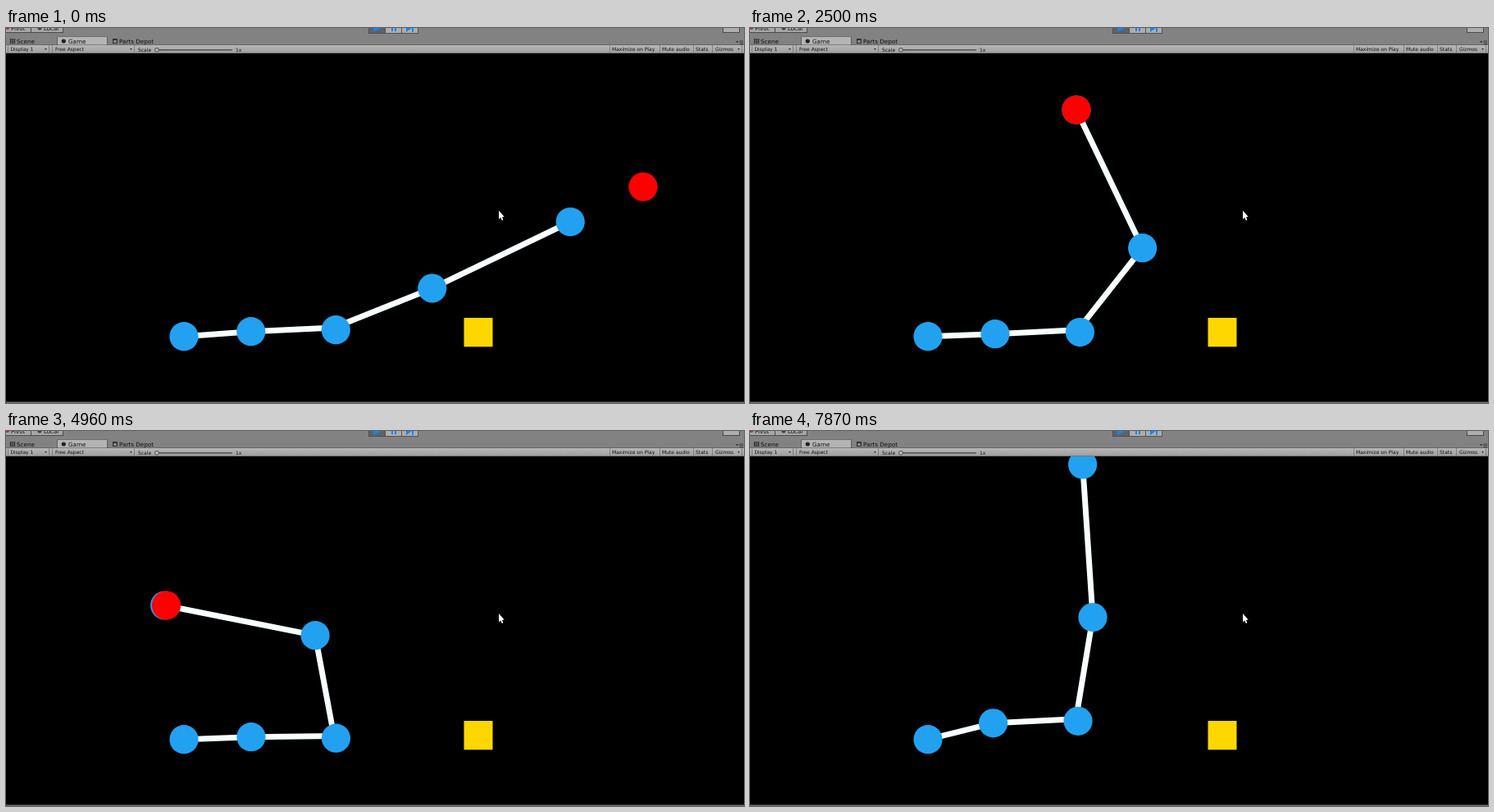
Write an HTML page with a canvas that moves like this. It is 900 by 458 pixels and loops after 7990 ms.

```html
<!DOCTYPE html>
<html lang="en">
<head>
<meta charset="utf-8">
<title>Robot arm</title>
<style>
  html, body { margin: 0; width: 100%; height: 100%; overflow: hidden; background: #000; }
  canvas { display: block; }
</style>
</head>
<body>
<canvas id="stage" width="900" height="458"></canvas>
<script>
const ctx = document.getElementById('stage').getContext('2d');
const LOOP = 7990, RAD = Math.PI / 180, R = 17.6;
const BASE = [217, 376.7], LENGTHS = [82, 103.5, 128, 187];
const BLUE = '#22a1f0';

// The picture advances in steps: [first, last, count]
const runs = [[0, 0, 1], [120, 510, 4], [940, 1940, 8], [2070, 3040, 8], [3160, 4140, 8],
  [4260, 5220, 8], [5340, 5880, 5], [6160, 7140, 8], [7280, 7870, 5]];
const steps = runs.flatMap(([a, b, n]) =>
  Array.from({ length: n }, (_, i) => n > 1 ? Math.round((a + (b - a) * i / (n - 1)) / 10) * 10 : a));

// Keyed values: [time, value], eased between keys
const targetX = [[0, 777], [830, 777], [1800, 398], [2500, 398], [3500, 728], [4000, 728],
  [4820, 162], [5320, 362], [6100, 362], [6900, 403]];
const targetY = [[0, 194], [1900, 194], [2420, 100], [3560, 100], [3960, 213], [5320, 213],
  [5650, 322], [5880, 286], [7200, 286], [8100, -56]];
const rootAngle = [[0, 4.2], [940, 4.2], [1640, 0], [2400, 2], [3310, 5.6], [4100, 4],
  [4960, 2.1], [5880, 0.8], [7200, 0.7], [7870, 14]];
const secondAngle = [[0, 1.1], [1640, 1.6], [3310, 0.8], [4960, -0.8], [5880, 0.9], [6990, 0.8], [7870, 1.4]];
const sway = [[0, -1.6], [510, 0], [3000, 0], [3310, 2.5], [3600, 0], [7300, 0], [7870, -8]];

function at(keys, t) {
  if (t <= keys[0][0]) return keys[0][1];
  for (let i = 1; i < keys.length; i++) {
    const [t1, v1] = keys[i], [t0, v0] = keys[i - 1];
    if (t < t1) {
      const u = (t - t0) / (t1 - t0);
      return v0 + (v1 - v0) * u * u * (3 - 2 * u);
    }
  }
  return keys[keys.length - 1][1];
}

const target = t => [at(targetX, t), at(targetY, t)];
const polar = ([x, y], len, ang) => [x + len * Math.cos(ang), y - len * Math.sin(ang)];
const aim = (p, q) => Math.atan2(p[1] - q[1], q[0] - p[0]);

function solveArm(t) {
  const goal = target(t - 4);
  const [l0, l1, l2, l3] = LENGTHS;
  const j1 = polar(BASE, l0, at(rootAngle, t) * RAD);
  const j2 = polar(j1, l1, at(secondAngle, t) * RAD);
  const d = Math.hypot(goal[0] - j2[0], goal[1] - j2[1]);
  const over = d - l2 - l3;
  let ang = aim(j2, goal);
  if (over > 0) {
    ang += at(sway, t) * RAD * Math.min(1, over / 40);
  } else {
    const c = (l2 * l2 + d * d - l3 * l3) / (2 * l2 * d);
    ang -= Math.acos(Math.max(-1, Math.min(1, c)));
  }
  const elbow = polar(j2, l2, ang);
  return [BASE, j1, j2, elbow, polar(elbow, l3, aim(elbow, goal))];
}

function rect(x, y, w, h, color) {
  ctx.fillStyle = color;
  ctx.fillRect(x, y, w, h);
}

function disc(x, y, r, color) {
  ctx.fillStyle = color;
  ctx.beginPath();
  ctx.arc(x, y, r, 0, 7);
  ctx.fill();
}

function shape(points, color) {
  ctx.fillStyle = color;
  ctx.beginPath();
  points.forEach(([x, y]) => ctx.lineTo(x, y));
  ctx.closePath();
  ctx.fill();
}

function label(str, x, y, size = 6, color = '#101010') {
  ctx.font = size + 'px "DejaVu Sans", sans-serif';
  ctx.fillStyle = color;
  ctx.fillText(str, x, y);
}

function shade(y, h, top, bottom) {
  const g = ctx.createLinearGradient(0, y, 0, y + h);
  g.addColorStop(0, top);
  g.addColorStop(1, bottom);
  return g;
}

function drawScene(t) {
  rect(0, 31, 900, 427, '#000');
  ctx.save();
  ctx.beginPath();
  ctx.rect(0, 31, 900, 426);
  ctx.clip();

  rect(558.5, 354, 35, 35.3, '#ffd700');

  const joints = solveArm(t);
  const links = joints.map((p, i) => i === 2 ? [p[0] - 2.5, p[1] - 2.7] : p);
  ctx.strokeStyle = '#f8feff';
  ctx.lineWidth = 7;
  ctx.lineJoin = 'round';
  ctx.beginPath();
  links.forEach(([x, y]) => ctx.lineTo(x, y));
  ctx.stroke();

  joints.forEach(([x, y]) => disc(x, y, R, BLUE));
  disc(...target(t), R, '#f00');
  ctx.restore();
  rect(0, 456.5, 900, 1.5, '#6c6c6c');
}

function drawPanel() {
  rect(0, 0, 900, 21, '#828282');

  // Top buttons, cut by the edge
  rect(0, 0, 69, 5, '#a6a6a6');
  rect(0, 5, 70, 1, '#4c4c4c');
  [30, 69].forEach(x => rect(x, 0, 1, 5, '#4c4c4c'));
  label('Pivot', 6, 3, 7);
  label('Local', 46, 3, 7);
  disc(2, 0, 2, '#a03030');
  disc(41, 0, 2.5, '#404040');
  rect(442, 0, 61, 7, '#505050');
  rect(443, 0, 19, 6, '#59636c');
  rect(463, 0, 19, 6, '#adadad');
  rect(483, 0, 19, 6, '#adadad');
  const blue = '#1686ee';
  shape([[448, 0], [457, 0], [448, 5]], blue);
  rect(470, 0, 2, 4, blue);
  rect(474, 0, 2, 4, blue);
  shape([[488, 0], [495, 0], [488, 5]], blue);
  rect(495, 0, 2, 5, blue);
  rect(874, 0, 21, 6, '#4c4c4c');
  rect(875, 0, 19, 5, '#adadad');

  // Tabs
  rect(62, 10.5, 62, 10.5, '#606060');
  rect(63, 11, 60, 10, '#b4b4b4');
  for (let i = 0; i < 3; i++) {
    rect(5 + i * 2.4, 13, 1, 6, '#333');
    rect(4.5, 13.5 + i * 2.2, 7, 0.9, '#333');
  }
  label('Scene', 13, 18.6, 7.2);
  disc(70.3, 16, 2.6, '#222');
  label('Game', 76, 18.6, 7.2);
  rect(130, 13, 6, 6, '#333');
  rect(131.2, 15, 3.6, 3, '#8a8a8a');
  label('Parts Depot', 138, 18.6, 7.2);
  shape([[890, 16], [893.5, 16], [891.7, 18.2]], '#333');
  [15.5, 17.2, 19].forEach(y => rect(894.5, y, 4.5, 0.8, '#333'));

  // View toolbar
  rect(0, 20.5, 900, 10.5, '#4e4e4e');
  rect(0, 21, 900, 9.5, shade(21, 9.5, '#b6b6b6', '#a0a0a0'));
  [2, 52, 56, 156, 736, 797, 838, 861, 897].forEach(x => rect(x, 21, 0.8, 9.5, '#777'));
  label('Display 1', 5.5, 28.4);
  label('Free Aspect', 60, 28.4);
  label('Scale', 161, 28.6);
  label('1x', 280, 28.6);
  label('Maximize on Play', 739, 28.4);
  label('Mute audio', 800, 28.4);
  label('Stats', 841, 28.4);
  label('Gizmos', 865, 28.4);
  [47, 151, 892].forEach(x => shape([[x, 25], [x + 3, 25], [x + 1.5, 27]], '#333'));
  rect(182, 26, 94, 1.6, '#555');
  disc(184, 26.8, 2.8, '#555');
  disc(184, 26.8, 1.9, '#bbb');
}

function drawCursor() {
  shape([[601, 223], [601, 233.4], [603.2, 231.5], [604.8, 235], [606.4, 234.2],
    [604.9, 230.9], [607.6, 230.6]], '#fff');
}

function frame(now) {
  const t = now % LOOP;
  const step = steps.filter(s => s <= t).pop();
  drawScene(step);
  drawPanel();
  drawCursor();
}

const start = performance.now();
(function tick() {
  frame(Math.max(0, performance.now() - start));
  requestAnimationFrame(tick);
})();
</script>
</body>
</html>
```
